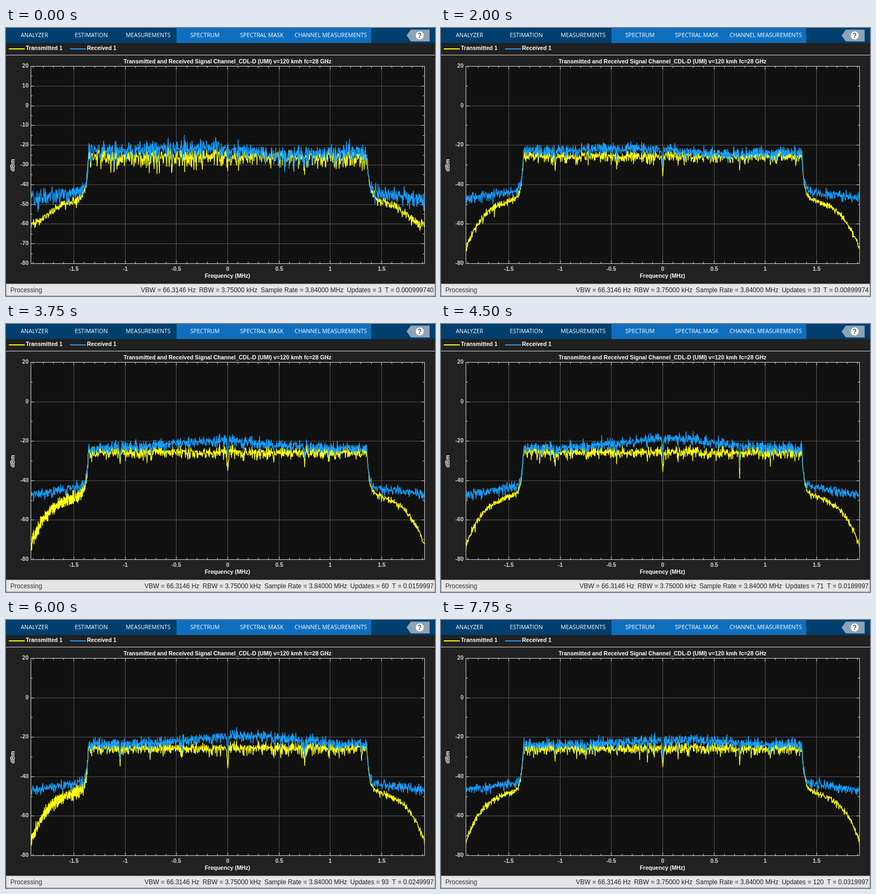
An HTML page with a canvas that plays this animation: 800x500 px, repeating every 8000 ms.

```html
<!DOCTYPE html>
<html lang="en">
<head>
<meta charset="utf-8">
<title>Spectrum analyzer</title>
<style>
  html, body { margin: 0; width: 100%; height: 100%; overflow: hidden; background: #212121; }
  canvas { display: block; }
</style>
</head>
<body>
<canvas id="stage" width="800" height="500"></canvas>
<script>
const ctx = document.getElementById('stage').getContext('2d');
const LOOP = 8000, STEP = 250, BINS = 1024, AVERAGES = 9, EDGE = 1.36, SPAN = 3.84;
const LEFT = 46.5, RIGHT = 780.5, TOP = 71.5, BOTTOM = 439.5;
const YELLOW = '#ffff11', BLUE = '#139fff';
const FAMILY = '"Liberation Sans", Arial, sans-serif';
const BOLD = `bold 10.5px ${FAMILY}`, PLAIN = `12px ${FAMILY}`;
const MENU = '10.65px "Open Sans", "Noto Sans", sans-serif';
const TABS = ['ANALYZER', 'ESTIMATION', 'MEASUREMENTS', 'SPECTRUM', 'SPECTRAL MASK', 'CHANNEL MEASUREMENTS'];

const xOf = mhz => LEFT + (mhz / SPAN + .5) * (RIGHT - LEFT);
const yOf = db => TOP + (20 - db) / 100 * (BOTTOM - TOP);
const toDb = power => 10 * Math.log10(power);
const toPower = db => 10 ** (db / 10);
const bell = (x, centre, width) => Math.exp(-(((x - centre) / width) ** 2));
const clamp = x => Math.min(1, Math.max(0, x));

function random(a, b, c) {
  let h = Math.imul(a + 1, 374761393) ^ Math.imul(b + 1, 668265263) ^ Math.imul(c + 1, 974634541);
  h = Math.imul(h ^ h >>> 15, 2246822519);
  h = Math.imul(h ^ h >>> 13, 3266489917);
  return ((h ^ h >>> 16) >>> 0) / 4294967296;
}

// Running average of noise power, so the trace calms down as updates arrive.
function noise(bin, updates, channel) {
  const count = Math.min(updates, AVERAGES);
  let sum = 0;
  for (let i = 0; i < count; i++) sum -= Math.log(random(bin, updates - i, channel) + 1e-6);
  return Math.max(-8.5, toDb(sum / count));
}

// Narrow dips every 0.3 MHz, deepest at the centre.
function notch(f) {
  const dip = (centre, depth, width) => depth * Math.max(0, 1 - Math.abs(f - centre) / width);
  let depth = dip(0, 9, .014) + dip(-1.05, 4, .009) + dip(.75, 4, .009);
  for (let c = -1.05; c < 1.1; c += .3) depth += dip(c, 3, .009);
  return depth;
}

// In-band received level: a hump drifts right and swells while a fade heals.
function fading(f, step) {
  const hump = 2 + 3.2 * bell(step, 20, 7);
  const centre = -.4 + .55 * clamp((step - 8) / 12);
  const fade = 2.2 * clamp(1 - step / 14);
  return -23.4 + .9 * Math.exp(-step) + hump * bell(f, centre, .65) - fade * bell(f, .5, .35);
}

const txSkirt = d => -27 - 19 * (1 - Math.exp(-d / .022)) - 15 * d - 18.3 * (d / .56) ** 4;
const rxSkirt = d => -27 - 15.5 * (1 - Math.exp(-d / .018)) - 8 * d;

function traces(step, updates) {
  const tx = [], rx = [];
  const leftRipple = 1.3 + .9 * Math.cos((step - 4.5) * Math.PI / 5);
  const floor = toPower(-60 - 3 * step);
  for (let bin = 0; bin <= BINS; bin++) {
    const f = SPAN * (bin / BINS - .5), d = Math.abs(f) - EDGE;
    const a = noise(bin, updates, 1), b = noise(bin, updates, 2);
    const comb = (bin % 2 ? 1 : -1) * (.3 + 1.2 * random(bin, step, 3));
    if (d < 0) {
      const dip = notch(f) * (step ? 1 : .4);
      tx.push(-25.5 + a * .9 + comb - dip);
      rx.push(fading(f, step) + a * .7 + b * .5 + comb - dip * .85);
    } else {
      const skirt = toDb(toPower(txSkirt(d)) + floor);
      tx.push(skirt + a * .45 + comb * (f < 0 ? leftRipple : .5));
      rx.push(rxSkirt(d) + b * .85 + comb * .5);
    }
  }
  return [tx, rx];
}

function rect(x, y, w, h, color) {
  ctx.fillStyle = color;
  ctx.fillRect(x, y, w, h);
}

function line(x1, y1, x2, y2, color, width = 1) {
  ctx.strokeStyle = color;
  ctx.lineWidth = width;
  ctx.beginPath();
  ctx.moveTo(x1, y1);
  ctx.lineTo(x2, y2);
  ctx.stroke();
}

function frame(x, y, w, h, color) {
  ctx.strokeStyle = color;
  ctx.lineWidth = 1;
  ctx.strokeRect(x, y, w, h);
}

function text(str, x, y, font, color, align = 'center') {
  ctx.font = font;
  ctx.fillStyle = color;
  ctx.textAlign = align;
  ctx.fillText(str, x, y);
}

function drawTrace(levels, color) {
  ctx.strokeStyle = color;
  ctx.lineWidth = 1.4;
  ctx.lineJoin = 'round';
  ctx.beginPath();
  levels.forEach((db, i) => ctx.lineTo(xOf(SPAN * (i / BINS - .5)), yOf(db)));
  ctx.stroke();
}

function drawHeader() {
  rect(0, 0, 800, 28, '#003f6e');
  rect(318, 0, 363, 28, '#0f6fbe');
  TABS.forEach((label, i) => text(label, 53 + 106 * i + (i === 5 ? 22.5 : 0), 14.5, MENU, '#fff'));
  ctx.fillStyle = '#8ba3b5';
  ctx.fill(new Path2D('M747 14L755 3H790V25H755Z'));
  ctx.fillStyle = '#fff';
  ctx.beginPath();
  ctx.arc(771.5, 14, 7.5, 0, 7);
  ctx.fill();
  text('?', 771.5, 14.5, `bold 12px ${FAMILY}`, '#33506a');

  line(5, 39, 35, 39, YELLOW, 2);
  text('Transmitted 1', 37, 38.5, BOLD, '#fff', 'left');
  line(119, 39, 149, 39, BLUE, 2);
  text('Received 1', 151, 38.5, BOLD, '#fff', 'left');
  line(0, 50.5, 800, 50.5, '#d8d8d8');
}

function drawAxes(spacing) {
  const grid = '#555', axis = '#d9d9d9';
  rect(LEFT, TOP, RIGHT - LEFT, BOTTOM - TOP, '#111');
  for (let db = 20; db >= -80; db -= spacing / 2) {
    const major = (20 - db) % spacing === 0, y = Math.round(yOf(db) - .5) + .5, tick = major ? 6 : 3;
    if (major) {
      line(LEFT, y, RIGHT, y, grid);
      text(db, 42, y, BOLD, axis, 'right');
    }
    line(LEFT, y, LEFT + tick, y, axis);
    line(RIGHT - tick, y, RIGHT, y, axis);
  }
  for (let i = -19; i <= 19; i++) {
    const major = i % 5 === 0, x = Math.round(xOf(i / 10) - .5) + .5, tick = major ? 6 : 3;
    if (major) {
      line(x, TOP, x, BOTTOM, grid);
      text(i / 10, x, 450, BOLD, axis);
    }
    line(x, TOP, x, TOP + tick, axis);
    line(x, BOTTOM - tick, x, BOTTOM, axis);
  }
  frame(LEFT, TOP, RIGHT - LEFT, BOTTOM - TOP, axis);
  text('Transmitted and Received Signal Channel_CDL-D (UMI) v=120 kmh fc=28 GHz', 413, 63.5, BOLD, '#fff');
  text('Frequency (MHz)', 413, 463.5, BOLD, '#fff');
  ctx.save();
  ctx.translate(13, 256);
  ctx.rotate(-Math.PI / 2);
  text('dBm', 0, 0, BOLD, '#fff');
  ctx.restore();
}

function drawStatus(step, updates) {
  const seconds = ((step + 1) / 1000 - 2.6e-7).toPrecision(6);
  const parts = [`T = ${seconds}`, `Updates = ${updates}`, 'Sample Rate = 3.84000 MHz',
    'RBW = 3.75000 kHz', 'VBW = 66.3146 Hz'];
  rect(0, 477, 800, 23, '#e6e6e6');
  frame(.5, 477.5, 799, 22, '#a6a6a6');
  text('Processing', 8, 489.5, PLAIN, '#333', 'left');
  let right = 797.5;
  for (const part of parts) {
    text(part, right, 489.5, PLAIN, '#222', 'right');
    right -= ctx.measureText(part).width + 6;
  }
}

function draw(step) {
  const updates = Math.floor(3.75 * (step + 1));
  const [tx, rx] = traces(step, updates);
  ctx.textBaseline = 'middle';
  rect(0, 0, 800, 500, '#212121');
  drawHeader();
  drawAxes(step ? 20 : 10);
  ctx.save();
  ctx.beginPath();
  ctx.rect(LEFT, TOP, RIGHT - LEFT, BOTTOM - TOP);
  ctx.clip();
  drawTrace(tx, YELLOW);
  drawTrace(rx, BLUE);
  ctx.restore();
  drawStatus(step, updates);
}

let shown = -1;
const start = performance.now();
function tick() {
  const step = Math.floor((performance.now() - start) % LOOP / STEP);
  if (step !== shown) draw(shown = step);
  requestAnimationFrame(tick);
}
tick();
</script>
</body>
</html>
```
